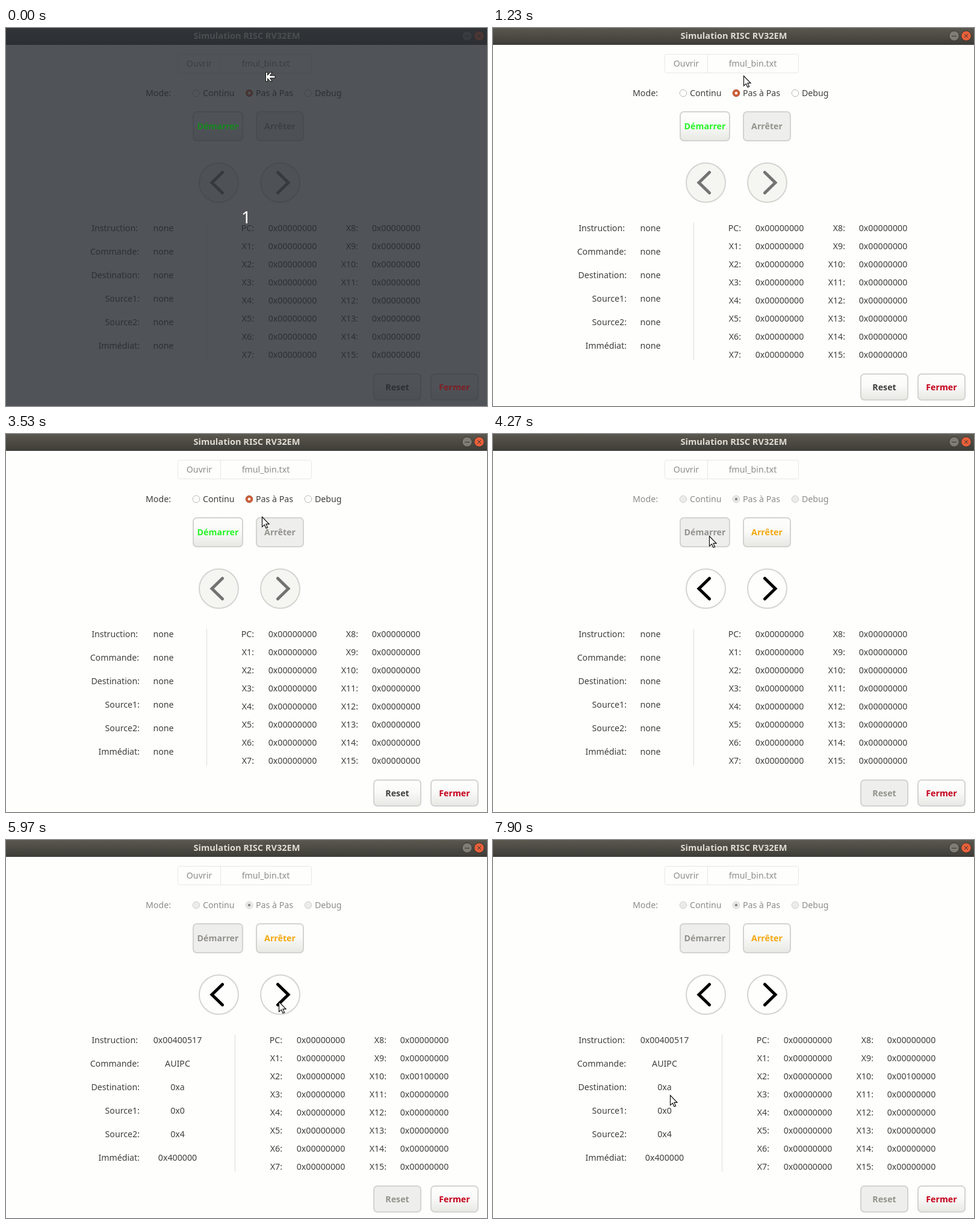
An HTML page for the animation above (8 s loop, 799 px wide and 627 px high).

```html
<!DOCTYPE html>
<html lang="fr">
<head>
<meta charset="utf-8">
<title>Simulation RISC RV32EM</title>
<style>
html, body { margin: 0; width: 100%; height: 100%; overflow: hidden; background: #fefefd; }
svg { display: block; width: 100%; height: 100%; }
text { font: 14.2px "Noto Sans", "Open Sans", sans-serif; fill: #3f3f3c; }
.bold { font-weight: bold; }
.mid { text-anchor: middle; }
.end { text-anchor: end; }
.dim, .running .mode text { fill: #8d8c87; }
.frame { fill: none; stroke: #e7e7e5; }
.button rect { fill: url(#face); stroke: #d3d4d0; stroke-width: 2; }
.button.off rect { fill: #eeeeec; }
.button.off text { fill: #93928c; }
.radio { fill: #fefefd; stroke: #bcbab4; }
.radio.on { fill: #cf6038; stroke: #a9553a; }
.dot { fill: #fff6ee; }
.running .radio { fill: #ebebe9; stroke: #cfcfcb; }
.running .dot { fill: #8d8c87; }
.arrow circle { fill: #f5f5f1; stroke: #d4d4d0; stroke-width: 2; }
.arrow path { fill: none; stroke: #737371; stroke-width: 5; stroke-linecap: round; }
.running .arrow circle { fill: #fefefd; }
.running .arrow path { stroke: #000; }
.hover #next circle { stroke: #f0a618; }
#veil .big { font-size: 28px; fill: #fff; }
</style>
</head>
<body>
<svg id="stage" viewBox="0 0 799 627"></svg>
<script>
const LOOP = 8000;
const START = 4270, HOVER = 4870, STEP = 5400;

// Pointer path: time, x, y
const PATH = [
  [0, 432, 80], [469, 432, 80], [470, 433, 76], [630, 433, 76],
  [1030, 371, 82], [1430, 460, 76], [1830, 377, 82], [2230, 486, 74],
  [2330, 459, 76], [2530, 428, 78], [2830, 437, 95], [3230, 459, 118],
  [3370, 446, 126], [3530, 425, 137], [3630, 425, 137], [3870, 378, 185],
  [4030, 359, 169], [4470, 359, 169], [4870, 440, 240], [5070, 473, 262],
  [5270, 463, 266], [5870, 463, 266], [5970, 453, 268], [6770, 315, 347],
  [7170, 258, 352], [7600, 322, 392], [7900, 294, 423]
];

const text = (x, y, s, cls = '', extra = '') =>
  `<text x="${x}" y="${y}" class="${cls}" ${extra}>${s}</text>`;

const button = (id, x, y, w, h, label, color) =>
  `<g id="${id}" class="button"><rect x="${x}" y="${y}" width="${w}" height="${h}" rx="6"/>` +
  text(x + w / 2, y + h / 2 + 5, label, 'bold mid', `fill="${color}" style="--c:${color}"`) + '</g>';

const radio = (x, label, on) =>
  `<circle class="radio ${on ? 'on' : ''}" cx="${x}" cy="108" r="5.8"/>` +
  (on ? `<circle class="dot" cx="${x}" cy="108" r="2.3"/>` : '') + text(x + 11, 113, label);

const arrow = (id, cx, tip, side) =>
  `<g id="${id}" class="arrow"><circle cx="${cx}" cy="256.5" r="32.5"/>` +
  `<path d="M${side} 239.5L${tip} 256.5L${side} 273.5"/></g>`;

const fields = [
  ['Instruction:', 219, '0x00400517'], ['Commande:', 221, 'AUIPC'],
  ['Destination:', 222, '0xa'], ['Source1:', 222, '0x0'],
  ['Source2:', 222, '0x4'], ['Immédiat:', 222, '0x400000']
];

const register = i => {
  const right = i > 7, y = 337 + 30 * (i % 8);
  return text(right ? 585 : 412, y, (i ? 'X' + i : 'PC') + ':', 'end') +
    text(right ? 648 : 476, y, '0x00000000', 'mid', `id="reg${i}"`);
};

const stage = document.getElementById('stage');
stage.innerHTML = `
<style>.button text { fill: var(--c); }</style>
<defs>
  <linearGradient id="face" x2="0" y2="1"><stop stop-color="#fefefe"/><stop offset=".45" stop-color="#fafaf9"/><stop offset="1" stop-color="#e7e8e3"/></linearGradient>
  <linearGradient id="bar" x2="0" y2="1"><stop stop-color="#5a584f"/><stop offset="1" stop-color="#3d3c37"/></linearGradient>
</defs>
<rect width="799" height="627" fill="#fefefd"/>
<rect width="799" height="28" fill="url(#bar)"/>
${text(400, 18, 'Simulation RISC RV32EM', 'bold mid', 'style="fill:#dfdbd2;font-size:14.6px"')}
<g stroke="#353430">
  <circle cx="766" cy="13" r="8.3" fill="#7e7c74"/><path d="M762 13.5h8"/>
  <circle cx="786" cy="13" r="8.3" fill="#e9603a"/><path d="M783 10l6 6m0-6l-6 6"/>
</g>
<rect class="frame" x="285.5" y="43.5" width="222" height="31" rx="3"/>
<path class="frame" d="M356.5 44v30"/>
${text(321, 64, 'Ouvrir', 'mid dim')}${text(431.5, 64, 'fmul_bin.txt', 'mid dim')}
<g class="mode">
  ${text(232, 113, 'Mode:')}${radio(316, 'Continu')}${radio(404, 'Pas à Pas', true)}${radio(502, 'Debug')}
</g>
${button('start', 311, 139, 82, 48, 'Démarrer', '#26f526')}
${button('stop', 416, 139, 78, 48, 'Arrêter', '#f5a70f')}
${button('reset', 611, 574, 78, 43, 'Reset', '#3f3f3c')}
${button('close', 706, 574, 78, 43, 'Fermer', '#c5001a')}
${arrow('prev', 353.5, 342, 359.5)}${arrow('next', 455.5, 469, 451.5)}
${fields.map(([label, x], i) => text(x, 337 + 39 * i, label, 'end') +
  text(261.5, 337 + 39 * i, 'none', 'mid', `id="field${i}"`)).join('')}
<g id="registers">
  <path d="M333.5 323v227" stroke="#dcdcda"/>
  ${Array.from({ length: 16 }, (_, i) => register(i)).join('')}
</g>
<path id="pointer" d="M.5 .5V17L4.4 13.4L7 19.3L9.6 18.2L7 12.4H12Z" fill="#fff" stroke="#111" stroke-width="1.2"/>
<g id="veil">
  <rect width="799" height="627" fill="rgb(40,45,51)" opacity=".81"/>
  ${text(352, 168, 'Démarrer', 'bold mid', 'style="fill:#1a8a22"')}
  ${text(745, 600.5, 'Fermer', 'bold mid', 'style="fill:#7e262b"')}
  ${text(399, 324, '1', 'big mid')}
  <path d="M431.5 73.5h3v5l4.5-5h3l-3.5 5.5h8.5v4h-8.5l3.5 5.5h-3l-4.5-5v5h-3z" fill="#fff" stroke="#111"/>
</g>`;

const el = id => document.getElementById(id);

function pointerAt(t) {
  let i = 1;
  while (i < PATH.length - 1 && PATH[i][0] < t) i++;
  const [t0, x0, y0] = PATH[i - 1], [t1, x1, y1] = PATH[i];
  const k = Math.min(1, Math.max(0, (t - t0) / (t1 - t0)));
  return [x0 + (x1 - x0) * k, y0 + (y1 - y0) * k].map(Math.round);
}

function draw(t) {
  const running = t >= START, stepped = t >= STEP;
  stage.classList.toggle('running', running);
  stage.classList.toggle('hover', t >= HOVER && !stepped);
  el('start').classList.toggle('off', running);
  el('reset').classList.toggle('off', running);
  el('stop').classList.toggle('off', !running);
  fields.forEach(([, , value], i) => {
    el('field' + i).textContent = stepped ? value : 'none';
    el('field' + i).setAttribute('x', stepped ? 285 : 261.5);
  });
  el('reg10').textContent = stepped ? '0x00100000' : '0x00000000';
  el('registers').setAttribute('transform', `translate(${stepped ? 47 : 0} 0)`);

  const veiled = t < 30;
  el('veil').style.display = veiled ? '' : 'none';
  el('pointer').style.display = veiled ? 'none' : '';
  // The pointer advances in steps of 100 ms
  const phase = t < 3600 ? 30 : t < 7000 ? 70 : 0;
  const stepTime = Math.floor((t - phase) / 100) * 100 + phase;
  el('pointer').setAttribute('transform', `translate(${pointerAt(stepTime)})`);
}

const origin = performance.now();
function tick() {
  draw((performance.now() - origin) % LOOP);
  requestAnimationFrame(tick);
}
tick();
</script>
</body>
</html>
```
